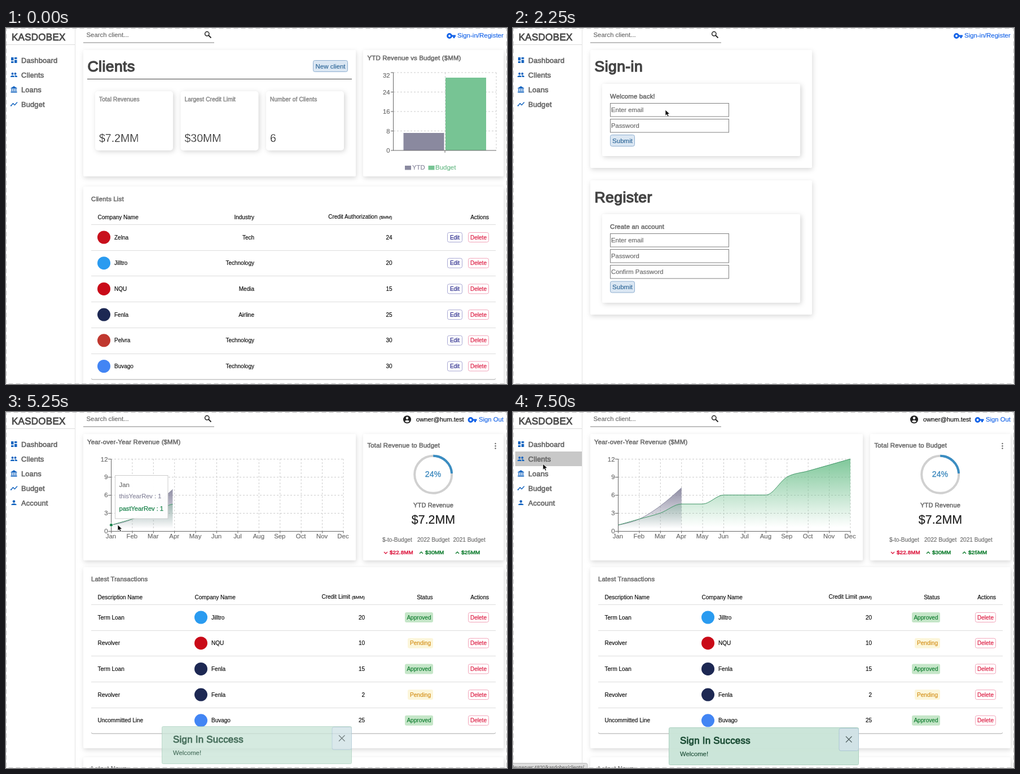
An HTML page for the animation above (8000 ms loop, 888 by 631 pixels).

```html
<!DOCTYPE html>
<html lang="en">
<head>
<meta charset="utf-8">
<title>Client dashboard</title>
<style>
html, body { margin: 0; width: 100%; height: 100%; overflow: hidden; background: #fff; }
svg { display: block; width: 888px; height: 631px; font-family: "Liberation Sans", Arial, sans-serif; }
text { white-space: pre; }
.card { fill: #fff; filter: drop-shadow(1px 3px 4px rgba(0,0,0,.15)); }
.tile { fill: #fff; filter: drop-shadow(2px 2px 4px rgba(0,0,0,.17)); }
.table { fill: #fff; filter: drop-shadow(0 1px .7px rgba(0,0,0,.35)); }
.grid { stroke: #ccc; stroke-dasharray: 3 3; fill: none; }
.axis { stroke: #666; fill: none; }
</style>
</head>
<body>
<svg id="stage" viewBox="0 0 888 631"></svg>
<script>
const GRAY = '#6b6b6b', INK = '#080808', BLUE = '#1565c0', LINK = '#1463e8', GREEN = '#0b7a2b', RED = '#dc143c';
const BRAND = 'KASDOBEX', MAIL = 'owner@hum.test', HOST = 'devserver:4820/kasdobex/';
const FIRMS = {
  Zelna: '#c8101c', Jilltro: '#2a9bf0', NQU: '#c90a18',
  Fenla: '#1d2853', Pelvra: '#c0382f', Buvago: '#4285f4'
};

// drawing helpers
const text = (x, y, s, size = 10, fill = INK, anchor = 'start', extra = `stroke="${fill}" stroke-width=".15"`) =>
  `<text x="${x}" y="${y}" font-size="${size}" fill="${fill}" text-anchor="${anchor}" ${extra}>${s}</text>`;
const medium = (x, y, s, size = 11.4, fill = GRAY, anchor = 'start') =>
  text(x, y, s, size, fill, anchor, `stroke="${fill}" stroke-width="${size * .05}" letter-spacing="${size * .015}"`);
const light = (x, y, s) => text(x, y, s, 19.5, '#000', 'start', 'stroke="#fff" stroke-width=".5"');
const rect = (x, y, w, h, attrs = '') => `<rect x="${x}" y="${y}" width="${w}" height="${h}" ${attrs}/>`;
const box = (x, y, x2, y2, cls = 'card', r = 2) => rect(x, y, x2 - x, y2 - y, `rx="${r}" class="${cls}"`);
const line = (x, y, x2, y2, attrs = 'stroke="#ddd"') => `<path d="M${x} ${y}L${x2} ${y2}" ${attrs}/>`;
const path = (d, attrs) => `<path d="${d}" ${attrs}/>`;
const circle = (x, y, r, attrs) => `<circle cx="${x}" cy="${y}" r="${r}" ${attrs}/>`;
const group = (id, body, attrs = '') => `<g id="${id}" ${attrs}>${body}</g>`;
const range = n => [...Array(n).keys()];

const button = (x, y, w, h, label, size, color, border, fill = '#fff') =>
  rect(x + .5, y + .5, w - 1, h - 1, `rx="3" fill="${fill}" stroke="${border}"`) +
  text(x + w / 2, y + h / 2 + size * .36, label, size, color, 'middle');
const softButton = (x, y, w, label) => button(x, y, w, 21, label, 11.5, '#2a6496', '#8fafd0', '#dbe7f3');
const remove = y => button(819, y - 9, 37, 18, 'Delete', 10, RED, '#f2a5ba');
const edit = y => button(782, y - 9, 27, 18, 'Edit', 10, '#1b1b84', '#a9a9d4');
const firm = (x, y, name) => circle(x, y, 11.5, `fill="${FIRMS[name]}"`) + text(x + 18.5, y + 3.6, name);
const money = (x, y, label) => text(x - 26, y, label, 10, INK, 'end') + text(x, y, '($MM)', 8, INK, 'end');
const heading = (y, s) => medium(144.5, y, s, 26.6, '#444');

const key = x => circle(x + 5, 14, 3.4, `fill="none" stroke="${LINK}" stroke-width="3"`) +
  path(`M${x + 8} 14H${x + 16}M${x + 13} 14v4`, `stroke="${LINK}" stroke-width="3" fill="none"`);

const ICONS = [
  y => rect(9, y - 5, 4.5, 5.5, `fill="${BLUE}"`) + rect(9, y + 2, 4.5, 3, `fill="${BLUE}"`) +
    rect(15, y - 5, 4.5, 3, `fill="${BLUE}"`) + rect(15, y - .5, 4.5, 5.5, `fill="${BLUE}"`),
  y => circle(11.5, y - 2, 2, `fill="${BLUE}"`) + circle(16.5, y - 2, 2, `fill="${BLUE}"`) +
    path(`M8 ${y + 4}v-1.5q3.5-3 7 0v1.5zM16 ${y + 4}v-2l-1-1q3-.6 5 1.4v1.6z`, `fill="${BLUE}"`),
  y => path(`M8.5 ${y - 2.5}L14 ${y - 6}l5.5 3.5v1h-11zM8.5 ${y + 3.5}h11v2h-11z`, `fill="${BLUE}"`) +
    path(`M10.5 ${y - 1}v4M14 ${y - 1}v4M17.5 ${y - 1}v4`, `stroke="${BLUE}" stroke-width="1.6"`),
  y => path(`M8.5 ${y + 3}l4-4 3 2.5 4.5-5`, `stroke="${BLUE}" stroke-width="1.4" fill="none"`) +
    circle(9, y + 2.7, 1.1, `fill="${BLUE}"`) + circle(12.5, y - 1, 1.1, `fill="${BLUE}"`),
  y => circle(14, y - 2.4, 2.3, `fill="${BLUE}"`) + path(`M9.5 ${y + 4}v-1.4q4.5-3.2 9 0v1.4z`, `fill="${BLUE}"`)
];
const MENU = ['Dashboard', 'Clients', 'Loans', 'Budget', 'Account'];
const menuItem = i => ICONS[i](57 + 26 * i) + medium(27, 62 + 26 * i, MENU[i], 12.8, '#666');

function clientsPage() {
  const rows = [['Zelna', 'Tech', 24], ['Jilltro', 'Technology', 20], ['NQU', 'Media', 15],
    ['Fenla', 'Airline', 25], ['Pelvra', 'Technology', 30], ['Buvago', 'Technology', 30]];
  const tiles = [['Total Revenues', '$7.2MM'], ['Largest Credit Limit', '$30MM'], ['Number of Clients', '6']];
  let s = box(137, 39, 620, 263) + heading(77, 'Clients') +
    line(144, 90.5, 613, 90.5, 'stroke="#444"') + softButton(544, 57, 62, 'New client');
  tiles.forEach(([name, value], i) => {
    const x = 158 + 151.5 * i;
    s += box(x, 112, x + 138, 217, 'tile', 5) + medium(x + 7, 130, name, 10.1, '#888') + light(x + 7, 202, value);
  });
  s += box(633, 39, 882, 263) + medium(640.5, 57, 'YTD Revenue vs Budget ($MM)');
  range(5).forEach(i => {
    const y = 217 - 34.5 * i;
    if (i) s += line(687, y, 869, y, 'class="grid"');
    s += line(682, y, 687, y, 'class="axis"') + text(680.5, i == 4 ? 88 : y + 4, 8 * i, 11.2, '#666', 'end');
  });
  s += path('M778.5 79V217M869 79V217', 'class="grid"') +
    rect(704.5, 186, 72, 31, 'fill="#8a899f"') + rect(779, 88, 72, 129, 'fill="#77c494"') +
    path('M686.5 79V217H869M778 217v4', 'class="axis"') +
    rect(707, 244, 11, 7.5, 'fill="#8a899f"') + text(720, 251, 'YTD', 11.3, '#85849a') +
    rect(748.5, 244, 11, 7.5, 'fill="#77c494"') + text(761, 251, 'Budget', 11.5, '#67b985');
  s += box(137, 281, 882, 650) + medium(151, 307, 'Clients List') + box(151, 321, 868, 622.5, 'table', 3) +
    text(162.5, 339, 'Company Name') + text(440, 339, 'Industry', 10, INK, 'end') +
    money(684.5, 338, 'Credit Authorization') + text(856, 339, 'Actions', 10, INK, 'end');
  rows.forEach(([name, kind, sum], i) => {
    const y = 371 + 45.7 * i, ly = Math.round(y - 23) + .5;
    s += line(151, ly, 868, ly) + firm(173.5, y, name) +
      text(440, y + 3.6, kind, 10, INK, 'end') + text(684.5, y + 3.6, sum, 10, INK, 'end') + edit(y) + remove(y);
  });
  return s;
}

const input = (y, hint) => rect(172.5, y + .5, 210, 23.5, 'fill="#fff" stroke="#808080"') +
  text(174, y + 16, hint, 11.35, '#666');

function signPage() {
  return box(137, 39, 530, 248) + heading(77, 'Sign-in') + box(158, 99, 509, 227, 'tile') +
    medium(172, 125, 'Welcome back!') + input(133, 'Enter email') +
    group('mail', rect(172.5, 133.5, 210, 23.5, 'fill="#e6eefd" stroke="#808080"') + text(174, 149, MAIL, 11.25, '#000')) +
    input(161, '') + group('hint', text(174, 177, 'Password', 11.35, '#666')) +
    group('caret', line(174.5, 167, 174.5, 179, 'stroke="#000"')) +
    group('dots', range(4).map(i => circle(176.8 + 4 * i, 173, 1.5, 'fill="#111"')).join('')) +
    softButton(172, 189, 44, 'Submit') +
    group('pressed', rect(170.5, 187.5, 47, 24, 'rx="5" fill="#cfe3f4"') +
      button(172, 189, 44, 21, 'Submit', 11.5, '#2a6496', '#6fa3cc', '#a2c8e5')) +
    box(137, 270, 530, 508) + heading(309, 'Register') + box(158, 330, 509, 487, 'tile') +
    medium(172, 356, 'Create an account') + input(364, 'Enter email') + input(392, 'Password') +
    input(420, 'Confirm Password') + softButton(172, 448.5, 44, 'Submit');
}

// monotone cubic through evenly spaced monthly values
const STEP = 411.5 / 11, px = i => 186.5 + STEP * i, py = v => 211 - 10.65 * v;
function curve(vals) {
  const p = vals.map(py), n = p.length, d = range(n - 1).map(i => p[i + 1] - p[i]), m = [];
  for (let i = 1; i < n - 1; i++) {
    const a = d[i - 1], b = d[i];
    m[i] = (Math.sign(a) + Math.sign(b)) * Math.min(Math.abs(a), Math.abs(b), Math.abs(a + b) / 4);
  }
  m[0] = (3 * d[0] - m[1]) / 2;
  m[n - 1] = (3 * d[n - 2] - m[n - 2]) / 2;
  return `M${px(0)} ${p[0]}` + d.map((_, i) =>
    `C${px(i + 1 / 3)} ${p[i] + m[i] / 3} ${px(i + 2 / 3)} ${p[i + 1] - m[i + 1] / 3} ${px(i + 1)} ${p[i + 1]}`).join('');
}
const area = (vals, fill, stroke) =>
  path(`${curve(vals)}V211H186.5Z`, `fill="url(#${fill})"`) + path(curve(vals), `fill="none" stroke="${stroke}"`);
const fade = (id, color) => `<linearGradient id="${id}" x1="0" y1="0" x2="0" y2="1">
  <stop offset=".05" stop-color="${color}" stop-opacity=".85"/><stop offset=".95" stop-color="${color}" stop-opacity="0"/></linearGradient>`;
const chevron = (x, y, dir) => path(`M${x - 3} ${y - 1.5 * dir}l3 ${3 * dir}l3 ${-3 * dir}`,
  `fill="none" stroke="${dir > 0 ? RED : GREEN}" stroke-width="1.3"`);

function dashPage() {
  const months = 'Jan Feb Mar Apr May Jun Jul Aug Sep Oct Nov Dec'.split(' ');
  const rows = [['Term Loan', 'Jilltro', 20, 1], ['Revolver', 'NQU', 10, 0], ['Term Loan', 'Fenla', 15, 1],
    ['Revolver', 'Fenla', 2, 0], ['Uncommitted Line', 'Buvago', 25, 1]];
  let s = box(137, 39, 620, 263) + medium(144, 57, 'Year-over-Year Revenue ($MM)');
  range(5).forEach(i => {
    const y = Math.round(py(3 * i)) + .5;
    if (i) s += line(186, y, 598, y, 'class="grid"');
    s += line(181, y, 186, y, 'class="axis"') + text(180.5, i == 4 ? 88 : y + 3.5, 3 * i, 11.4, '#666', 'end');
  });
  months.forEach((m, i) => {
    s += line(px(i), 83, px(i), 211, 'class="grid"') + line(px(i), 211, px(i), 215, 'class="axis"') +
      text(px(i) - .5, 224, m, 11.4, '#666', 'middle');
  });
  s += path('M186.5 83V211.5H598', 'class="axis"') +
    group('areas', area([1, 2, 4.2, 7.2], 'dusk', '#8a899f') +
      area([1, 2, 3, 4.5, 4.5, 6, 6, 6, 9, 10, 11, 12], 'leaf', '#3f9566'), 'clip-path="url(#reveal)"') +
    group('tip', rect(193.5, 112.5, 93.5, 76.5, 'fill="#fff" fill-opacity=".96" stroke="#ccc"') +
      text(200.5, 133, 'Jan', 11.4, '#666') + text(200.5, 153, 'thisYearRev : 1', 11.1, '#85849a') +
      text(200.5, 175, 'pastYearRev : 1', 11.1, '#168048', 'start', 'stroke="#168048" stroke-width=".25"') +
      circle(186.5, 200.3, 3, 'fill="#168048" stroke="#fff"'));
  s += box(633, 39, 882, 263) + medium(640.5, 63, 'Total Revenue to Budget') +
    [56, 60.2, 64.5].map(y => circle(867.5, y, 1.2, 'fill="#666"')).join('') +
    circle(757.2, 110.8, 33, 'fill="none" stroke="#d0d0d0" stroke-width="4"') +
    circle(757.2, 110.8, 33, 'fill="none" stroke="#3a8dc2" stroke-width="4" pathLength="100" stroke-dasharray="24 76" transform="rotate(-90 757.2 110.8)"') +
    text(757, 115, '24%', 14.2, '#3a87bd', 'middle', 'stroke="#3a87bd" stroke-width=".3"') +
    medium(757.5, 169, 'YTD Revenue', 11, GRAY, 'middle') + text(757.5, 198, '$7.2MM', 21.4, '#1c1c1c', 'middle');
  [['$-to-Budget', '$22.8MM', 667, 680, 1], ['2022 Budget', '$30MM', 729, 743, -1], ['2021 Budget', '$25MM', 792.5, 807, -1]]
    .forEach(([name, sum, x, vx, dir]) => {
      s += text(x, 230, name, 10.1, GRAY) + medium(vx, 252, sum, 9.8, dir > 0 ? RED : GREEN) + chevron(vx - 7, 249.5, dir);
    });
  s += box(137, 275, 882, 596) + medium(151, 300, 'Latest Transactions', 11.2) + box(151, 315, 868, 569.5, 'table', 3) +
    text(162.5, 332, 'Description Name') + text(334.5, 332, 'Company Name') + money(636, 331, 'Credit Limit') +
    text(756.5, 332, 'Status', 10, INK, 'end') + text(856, 332, 'Actions', 10, INK, 'end');
  rows.forEach(([kind, name, sum, ok], i) => {
    const y = 364 + 45.7 * i, ly = Math.round(y - 23) + .5, w = ok ? 50 : 45;
    s += line(151, ly, 868, ly) + text(162.5, y + 3.6, kind) + firm(345.5, y, name) +
      text(636, y + 3.6, sum, 10, INK, 'end') +
      rect(757 - w, y - 9, w, 18, `rx="3" fill="${ok ? '#c5e6c8' : '#fcf6da'}"`) +
      text(757 - w / 2, y + 3.6, ok ? 'Approved' : 'Pending', 10.1, ok ? GREEN : '#d38d14', 'middle') + remove(y);
  });
  return s + box(137, 612, 882, 660) + medium(151, 635.5, 'Latest News', 11.2);
}

const toast = group('toast', rect(276.5, 559.5, 336, 66, 'rx="2" fill="#cae5d8" stroke="#a9cfbd"') +
  medium(296, 587.5, 'Sign In Success', 16.9, '#14472f') + text(296, 610, 'Welcome!', 11.3, '#14472f') +
  rect(578, 560.5, 34.5, 40, 'rx="3" fill="#d0e2e6" stroke="#a9c6d2"') +
  path('M590 575l10.5 10.5M600.5 575l-10.5 10.5', 'stroke="#4b5a5a" stroke-width="1.2"'));

const $ = id => document.getElementById(id);
$('stage').innerHTML = `<defs>${fade('leaf', '#70c18e')}${fade('dusk', '#807e98')}
  <clipPath id="reveal"><rect id="wipe" x="186" y="70" width="0" height="142"/></clipPath></defs>` +
  rect(0, 0, 888, 631, 'fill="#fff"') +
  line(122.5, 0, 122.5, 631, 'stroke="#e2e2e2"') + line(0, 29.5, 122, 29.5, 'stroke="#ddd"') +
  group('hover', rect(4, 0, 118, 26, 'fill="#c8c8c8"')) +
  medium(10, 22, BRAND, 17, '#4a4a4a') + range(4).map(menuItem).join('') +
  text(142.5, 16, 'Search client...', 11.35, '#666') +
  line(137, 26, 369, 26, 'stroke="#aaa" stroke-width="1.6"') +
  circle(356.3, 10.3, 3.7, 'fill="none" stroke="#222" stroke-width="1.5"') +
  line(359, 13, 363.5, 17.5, 'stroke="#222" stroke-width="1.8"') +
  group('guest', group('linkHover', rect(780, 4, 103, 18, 'fill="#c9c9c9"')) + key(781) +
    text(800, 16.5, 'Sign-in/Register', 11.5, LINK)) +
  group('member', menuItem(4) + circle(711, 13.3, 7, 'fill="#222"') + circle(711, 10.8, 2.2, 'fill="#fff"') +
    path('M706.8 16.3q4.2-3.6 8.4 0q-4.2 4.4-8.4 0z', 'fill="#fff"') +
    text(727, 17, MAIL, 11.2, INK) + key(818.5) + text(838, 16.5, 'Sign Out', 11.3, LINK)) +
  group('clients', clientsPage()) + group('sign', signPage()) + group('dash', dashPage() + toast) +
  rect(.5, .5, 887, 630, 'fill="none" stroke="#c2c2c2" stroke-dasharray="8 5"') +
  group('status', rect(-4, 622.5, 0, 16, 'id="bar" rx="3" fill="#dedede" stroke="#bbb"') +
    text(-3, 633, '', 8.7, '#555', 'start', 'id="url"')) +
  group('cursor', path('M0 0V10.5L2.5 8.2L4.3 12.2L6.2 11.4L4.5 7.5H8Z', 'fill="#000" stroke="#fff" stroke-width=".8"'));

// pointer stops: time, x, y
const STOPS = [[250, 690, 190], [500, 745, 85], [750, 780, 19], [1250, 780, 19], [1500, 700, 45], [1750, 560, 85],
  [2000, 410, 120], [2250, 270, 145], [2500, 250, 147], [2750, 249, 152], [3250, 248, 176], [4250, 248, 176],
  [4750, 198, 200], [5500, 198, 200], [6000, 92, 152], [6250, 74, 126], [6500, 70, 124], [7000, 62, 110], [7500, 53, 92]];
function pointer(t) {
  const i = STOPS.findIndex(s => s[0] >= t);
  if (i < 0) return STOPS[STOPS.length - 1].slice(1);
  if (i == 0) return STOPS[0].slice(1);
  const a = STOPS[i - 1], b = STOPS[i], k = (t - a[0]) / (b[0] - a[0]);
  return [a[1] + (b[1] - a[1]) * k, a[2] + (b[2] - a[2]) * k];
}

// cubic-bezier(.25, .1, .25, 1)
function ease(x) {
  if (x <= 0) return 0;
  if (x >= 1) return 1;
  const bez = (a, b, u) => 3 * a * u * (1 - u) ** 2 + 3 * b * u * u * (1 - u) + u ** 3;
  let lo = 0, hi = 1;
  for (let i = 0; i < 24; i++) {
    const mid = (lo + hi) / 2;
    if (bez(.25, .25, mid) < x) lo = mid; else hi = mid;
  }
  return bez(.1, 1, lo);
}

const show = (id, on) => $(id).setAttribute('display', on ? 'inline' : 'none');

function draw(ms) {
  const t = Math.floor(ms % 8000 / 250) * 250;
  const [x, y] = pointer(t);
  const member = t >= 5000;
  show('clients', t < 1000);
  show('sign', t >= 1000 && !member);
  show('dash', member);
  show('guest', !member);
  show('member', member);
  show('cursor', t >= 250);
  $('cursor').setAttribute('transform', `translate(${x} ${y})`);

  show('linkHover', t >= 750 && x >= 780 && y < 22);
  const item = Math.floor((y - 44) / 26), over = member && x < 122;
  show('hover', over);
  $('hover').setAttribute('transform', `translate(0 ${44 + 26 * item})`);

  const registering = t >= 1000 && t < 1750;
  show('status', registering || t >= 6500);
  $('bar').setAttribute('width', registering ? 301 : 136);
  $('url').textContent = HOST + (registering ? 'account/register' : over ? MENU[item].toLowerCase() + '/' : '');

  const typed = Math.max(0, Math.min(4, Math.ceil((t - 3500) / 188)));
  show('mail', t >= 2500);
  show('hint', !typed);
  show('caret', t >= 3250 && !typed);
  [...$('dots').children].forEach((d, i) => d.setAttribute('display', i < typed ? 'inline' : 'none'));
  show('pressed', t >= 4750);

  $('wipe').setAttribute('width', 413 * ease((t - 4970) / 1500));
  show('tip', x >= 186);
  const k = Math.max(0, Math.min(1, (t - 4800) / 600));
  $('toast').setAttribute('transform', `translate(0 ${-8 * (1 - k)})`);
  $('toast').setAttribute('opacity', .2 + .77 * k);
}

const begin = performance.now();
function tick() {
  draw(performance.now() - begin);
  requestAnimationFrame(tick);
}
tick();
</script>
</body>
</html>
```
